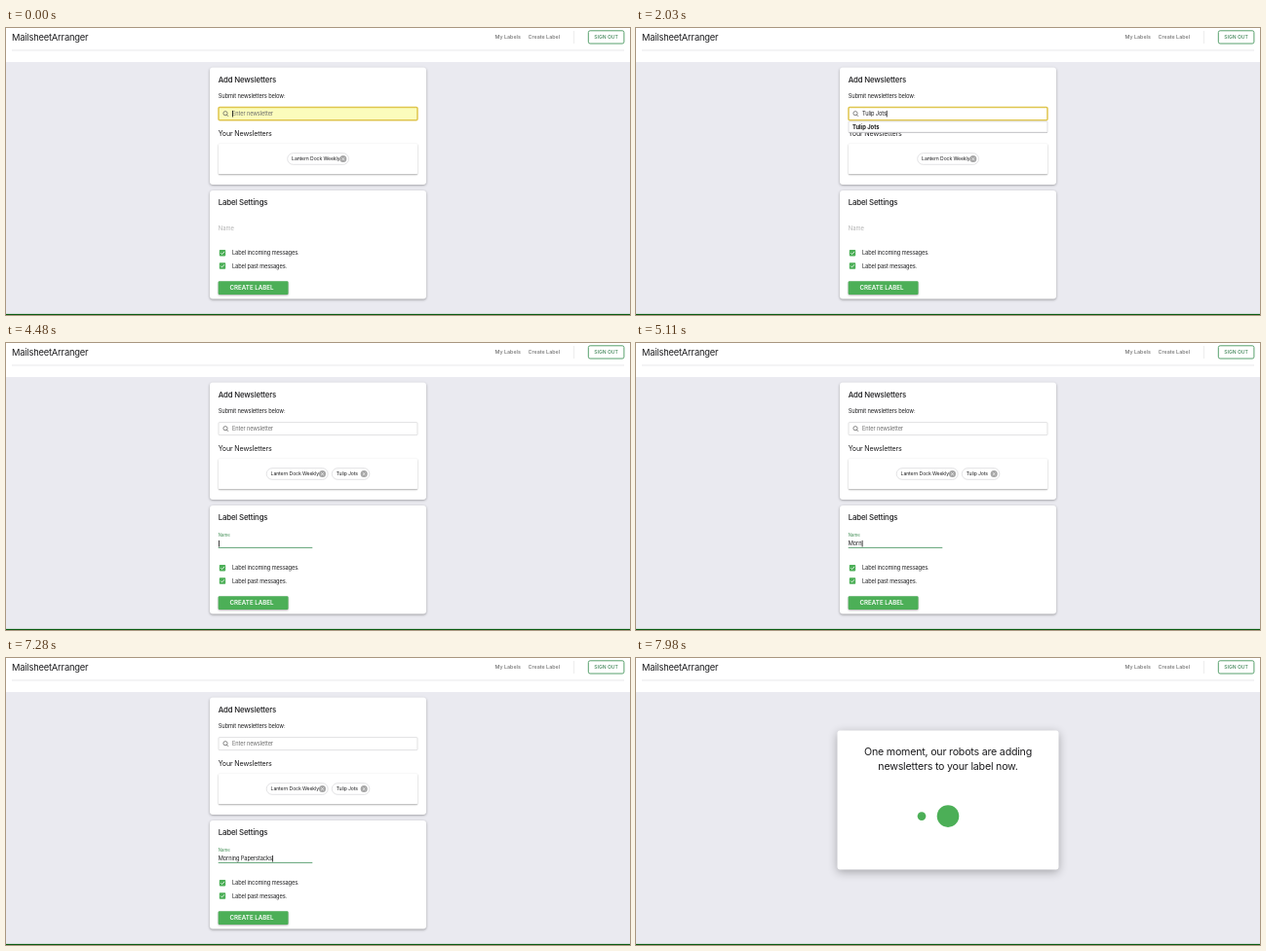
An HTML page with a canvas that plays this animation: 640 px wide and 295 px high, repeating every 8 s.

```html
<!DOCTYPE html>
<html lang="en">
<head>
<meta charset="utf-8">
<title>Label form</title>
<style>
html, body { margin: 0; width: 100%; height: 100%; overflow: hidden; background: #eaeaf0; }
canvas { display: block; width: 640px; height: 295px; }
</style>
</head>
<body>
<canvas id="stage"></canvas>
<script>
const W = 640, H = 295, LOOP = 8000;
const canvas = document.getElementById('stage');
const ctx = canvas.getContext('2d');
const dpr = window.devicePixelRatio || 1;
canvas.width = W * dpr;
canvas.height = H * dpr;

const GREEN = '#4caf57', INK = '#1c1c1e', YELLOW = '#dfc54e';
const QUERY = 'Tulip Jots', LABEL = 'Morning Paperstacks';
const OPTIONS = ['Tulip Jots', 'Tundra Ink', 'Tundra ink', 'Tulip'];
const QUERY_KEYS = [840, 910, 1050, 1120, 1190, 1330, 1470, 1610, 1820, 2030];
const LABEL_KEYS = [4620, 4760, 4900, 5110, 5250, 5390, 5460, 5600, 5950, 6090,
  6160, 6300, 6440, 6580, 6720, 6860, 7000, 7140, 7280];
const ADDED = 2870, NAME_FOCUS = 4130, SAVING = 7560;

const clamp = x => Math.max(0, Math.min(1, x));
const typed = (text, keys, t) => text.slice(0, keys.filter(k => k <= t).length);

function bezier(x1, y1, x2, y2) {
  const at = (a, b, u) => 3 * a * u * (1 - u) ** 2 + 3 * b * u * u * (1 - u) + u ** 3;
  return x => {
    let lo = 0, hi = 1;
    for (let i = 0; i < 20; i++) {
      const mid = (lo + hi) / 2;
      if (at(x1, x2, mid) < x) lo = mid; else hi = mid;
    }
    return at(y1, y2, lo);
  };
}
const easeOut = bezier(0, 0, .2, 1);
const grow = bezier(.2, .2, .4, .8);
const shrink = bezier(.2, .6, .4, .8);

function text(str, x, y, size, { weight = 400, color = INK, align = 'left', track = -.02 } = {}) {
  ctx.font = `${weight} ${size}px Inter, "Open Sans", sans-serif`;
  ctx.letterSpacing = `${track * size}px`;
  ctx.textAlign = align;
  ctx.fillStyle = color;
  ctx.fillText(str, x, y);
  return ctx.measureText(str).width;
}

function rect(x, y, w, h, color) {
  ctx.fillStyle = color;
  ctx.fillRect(x, y, w, h);
}

function box(x, y, w, h, r, fill, stroke, line = .6) {
  ctx.beginPath();
  ctx.roundRect(x, y, w, h, r);
  if (fill) { ctx.fillStyle = fill; ctx.fill(); }
  if (stroke) { ctx.strokeStyle = stroke; ctx.lineWidth = line; ctx.stroke(); }
}

function raised(x, y, w, h, r, fill, blur, dy, alpha) {
  ctx.save();
  ctx.shadowColor = `rgba(0,0,0,${alpha})`;
  ctx.shadowBlur = blur * dpr;
  ctx.shadowOffsetY = dy * dpr;
  box(x, y, w, h, r, fill);
  ctx.restore();
}

function disc(x, y, r, color) {
  ctx.beginPath();
  ctx.arc(x, y, r, 0, 7);
  ctx.fillStyle = color;
  ctx.fill();
}

function path(points, color, width) {
  ctx.beginPath();
  points.forEach(([x, y]) => ctx.lineTo(x, y));
  ctx.strokeStyle = color;
  ctx.lineWidth = width;
  ctx.stroke();
}

function header() {
  rect(0, 0, W, 35, '#fff');
  text('MailsheetArranger', 6, 12.6, 9.33);
  text('My Labels', 501.5, 11, 5.4, { weight: 500, color: '#737373', track: 0 });
  text('Create Label', 535.5, 11, 5.4, { weight: 500, color: '#737373', track: 0 });
  rect(582, 3, .6, 13, '#e2e2e2');
  box(597.3, 2.8, 36.6, 13.2, 1.8, '#fff', '#57a06c', 1);
  text('SIGN OUT', 615.6, 11.2, 5.1, { weight: 500, color: '#3f8557', align: 'center', track: 0 });
  rect(6, 22.6, 628, .7, '#dedee0');
}

function chip(x, w, name) {
  box(x, 128.7, w, 11.6, 5.8, '#fff', '#cfcfd2');
  text(name, x + 4.4, 136.4, 5.1);
  const cx = x + w - 5.7, cy = 134.6;
  disc(cx, cy, 3.5, '#a6a6a6');
  path([[cx - 1.3, cy - 1.3], [cx + 1.3, cy + 1.3]], '#fff', .7);
  path([[cx + 1.3, cy - 1.3], [cx - 1.3, cy + 1.3]], '#fff', .7);
}

function checkbox(y, label) {
  box(218.8, y - 3.2, 6.4, 6.4, .8, GREEN);
  path([[220.2, y], [221.5, y + 1.4], [224, y - 1.3]], '#fff', .8);
  text(label, 232, y + 2, 5.7);
}

function caret(x, y) {
  rect(x, y, .8, 6.6, '#111');
}

function searchField(t) {
  const focused = t < NAME_FOCUS;
  if (focused) {
    const glow = 1 - clamp((t - 140) / 350);
    box(218, 81.4, 204, 13.4, 1, '#fff');
    ctx.globalAlpha = glow;
    box(218, 81.4, 204, 13.4, 1, '#fbfcbc');
    ctx.globalAlpha = 1;
    box(218, 81.4, 204, 13.4, 1.2, null, YELLOW, 1.5);
  } else {
    box(218, 81.6, 204, 13, 1, '#fff', '#cdcdcf');
  }
  ctx.beginPath();
  ctx.arc(225, 87.7, 2.1, 0, 7);
  ctx.strokeStyle = '#555';
  ctx.lineWidth = .7;
  ctx.stroke();
  path([[226.5, 89.2], [228, 90.8]], '#555', .8);

  const value = t < ADDED ? typed(QUERY, QUERY_KEYS, t) : '';
  const width = value
    ? text(value, 232, 90.2, 5.7)
    : text('Enter newsletter', 232, 90.2, 5.7, { color: '#6c6c6c' }) * 0;
  const blink = (t >= 2590 && t < ADDED) || (t >= 3430 && t < 3920);
  if (focused && !blink) caret(232 + width, 84.9);
}

function dropdown(t) {
  if (t < QUERY_KEYS[0] || t >= NAME_FOCUS) return;
  const query = typed(QUERY, QUERY_KEYS, t);
  const found = OPTIONS.filter(o => o.startsWith(query));
  const h = found.length * 10.7 + .5;
  box(218, 96, 204, h, .5, '#fff', '#cbcbce');
  rect(218, 95.8 + h, 204, .7, '#bdbdc0');
  found.forEach((o, i) => text(o, 222, 103.9 + i * 10.7, 5.8, { weight: 700, color: '#111', track: 0 }));
}

function nameField(t) {
  const p = easeOut(clamp((t - NAME_FOCUS) / 210));
  const mix = (a, b) => Math.round(a + (b - a) * p);
  const color = `rgb(${mix(178, 62)},${mix(178, 140)},${mix(178, 82)})`;
  text('Name', 217.8, 207.6 - 8.6 * p, 5.8 - 1.5 * p, { color, track: 0 });
  if (t < NAME_FOCUS) return;
  rect(266 - 48.3 * p, 209.9, 96.6 * p, .9, '#4f9a68');
  const width = text(typed(LABEL, LABEL_KEYS, t), 217.8, 207.9, 5.7);
  caret(218 + width, 202.9);
}

function form(t) {
  raised(209, 40.6, 222, 120.4, 3, '#fff', 2.5, .8, .35);
  text('Add Newsletters', 217.7, 56, 7.8, { weight: 500 });
  text('Submit newsletters below:', 217.8, 72.4, 5.75);
  text('Your Newsletters', 217.7, 110.8, 7.1);
  raised(218, 119, 204, 31.2, 1, '#fff', 1.6, .7, .4);
  if (t < ADDED) {
    chip(288.7, 62.8, 'Lantern Dock Weekly');
  } else {
    chip(267.2, 63, 'Lantern Dock Weekly');
    chip(334.3, 38.6, QUERY);
  }
  searchField(t);
  dropdown(t);

  raised(209, 167, 222, 111.6, 3, '#fff', 2.5, .8, .35);
  text('Label Settings', 217.7, 182.3, 7.8, { weight: 500 });
  nameField(t);
  checkbox(231.2, 'Label incoming messages.');
  checkbox(244.5, 'Label past messages.');
  raised(217.7, 260.2, 71.8, 13.8, 1.2, GREEN, 2, .8, .35);
  text('CREATE LABEL', 252, 269.4, 6.2, { weight: 600, color: '#fff', align: 'center', track: 0 });
}

function bubble(ms) {
  const p = ms / 1200;
  if (p <= 0) return 0;
  if (p < .2) return grow(p / .2);
  return p < .7 ? 1 - shrink((p - .2) / .5) : 0;
}

function saving(t) {
  raised(206.5, 74.5, 227, 143, 3, '#fff', 10, 2.5, .3);
  text('One moment, our robots are adding', 320, 99.6, 10.67, { align: 'center' });
  text('newsletters to your label now.', 320, 115, 10.67, { align: 'center' });
  const since = t - SAVING + 45;
  for (let i = 0; i < 3; i++) {
    const r = 13.4 * bubble(since - i * 300);
    if (r > 0) disc(293 + i * 27, 162.6, r, GREEN);
  }
}

function draw(t) {
  ctx.setTransform(dpr, 0, 0, dpr, 0, 0);
  rect(0, 0, W, H, '#eaeaf0');
  header();
  if (t < SAVING) form(t); else saving(t);
  rect(0, 293.9, W, 1.1, '#0b5c12');
}

const start = performance.now();
function tick() {
  draw((performance.now() - start) % LOOP);
  requestAnimationFrame(tick);
}
tick();
</script>
</body>
</html>
```
